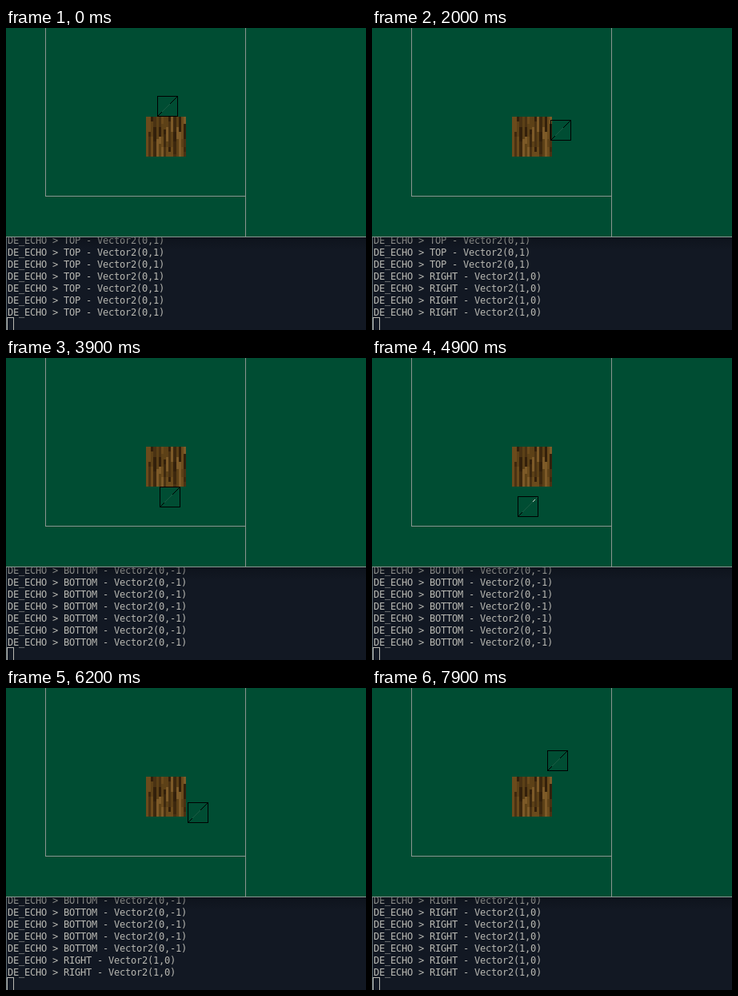
These frames come from a looping animation (450x378 px, 8000 ms). An HTML page with a canvas:

```html
<!DOCTYPE html>
<html lang="en">
<head>
<meta charset="utf-8">
<title>Collision sides</title>
<style>
  html, body { margin: 0; width: 100%; height: 100%; overflow: hidden; background: #004d33; }
  canvas { display: block; }
</style>
</head>
<body>
<canvas id="stage" width="450" height="378"></canvas>
<script>
const ctx = document.getElementById('stage').getContext('2d');
const LOOP = 8000, STEP = 100;
const BLOCK = { x: 175, y: 111, size: 50 };
const BOX = 26;
const CELL = { w: 7, h: 15 }, ROWS = 7, LINES_PER_STEP = 2;
const LINE = '#8a9690', TEXT = '#b8b8b2';

// Key points of the tour around the block: time, x, y
const path = [
  [0, 189, 85], [500, 199, 97], [900, 221, 67], [1200, 234, 71], [1700, 235, 108],
  [2000, 223, 115], [2800, 235, 133], [3100, 235, 157], [3900, 192, 161], [4900, 182, 173],
  [5800, 234, 162], [6200, 227, 143], [6700, 226, 141], [7400, 236, 92], [7900, 219, 78]
];

const messages = {
  top: 'TOP - Vector2(0,1)',
  right: 'RIGHT - Vector2(1,0)',
  bottom: 'BOTTOM - Vector2(0,-1)',
  left: 'LEFT - Vector2(-1,0)'
};

function rect(color, x, y, w, h) {
  ctx.fillStyle = color;
  ctx.fillRect(x, y, w, h);
}

function frame(color, x, y, w, h) {
  ctx.strokeStyle = color;
  ctx.lineWidth = 1;
  ctx.strokeRect(x + .5, y + .5, w - 1, h - 1);
}

function randomizer(seed) {
  return () => (seed = (seed * 16807) % 2147483647) / 2147483647;
}

// Vertical streaks on a 16 x 16 tile, dark grooves between lighter ridges
function makeBark() {
  const tile = document.createElement('canvas');
  tile.width = tile.height = 16;
  const pen = tile.getContext('2d');
  const random = randomizer(4217);
  const grooves = ['#33200b', '#3d280e', '#4a3213'];
  const ridges = ['#5d4117', '#6b4b1c', '#7d5a28'];
  for (let col = 0; col < 16; col++) {
    for (let row = 0; row < 16;) {
      const run = 2 + Math.floor(random() * 5);
      const groove = random() < (col % 2 ? .75 : .15);
      pen.fillStyle = (groove ? grooves : ridges)[Math.floor(random() * 3)];
      pen.fillRect(col, row, 1, run);
      row += run;
    }
  }
  return tile;
}
const bark = makeBark();

// Smooth curve through the key points
function positionAt(time) {
  const last = path.length - 1;
  let i = 0;
  while (i < last - 1 && path[i + 1][0] <= time) i++;
  const a = path[i], b = path[i + 1];
  const before = path[Math.max(i - 1, 0)], after = path[Math.min(i + 2, last)];
  const span = b[0] - a[0];
  const k = (time - a[0]) / span;
  return [1, 2].map(n => {
    const leave = (b[n] - before[n]) / (b[0] - before[0]) * span;
    const arrive = (after[n] - a[n]) / (after[0] - a[0]) * span;
    const ease = k * k * (3 - 2 * k);
    return Math.round(a[n] + (b[n] - a[n]) * ease
      + leave * k * (1 - k) ** 2 - arrive * k * k * (1 - k));
  });
}

// Nearest side of the block and the distance to it
function contact([x, y]) {
  const gaps = {
    top: BLOCK.y - y - BOX,
    right: x - BLOCK.x - BLOCK.size,
    bottom: y - BLOCK.y - BLOCK.size,
    left: BLOCK.x - x - BOX
  };
  const side = Object.keys(gaps).reduce((a, b) => gaps[b] > gaps[a] ? b : a);
  return { side, gap: gaps[side] };
}

function logAt(time) {
  const lines = Array(ROWS).fill(messages.top);
  for (let t = 0; t <= time; t += STEP) {
    const { side, gap } = contact(positionAt(t));
    if (gap <= 2) lines.push(...Array(LINES_PER_STEP).fill(messages[side]));
  }
  return lines.slice(-ROWS);
}

function drawWorld() {
  rect('#004d33', 0, 0, 450, 261);
  rect(LINE, 49, 0, 1, 211);
  rect(LINE, 299, 0, 1, 261);
  rect(LINE, 50, 210, 249, 1);
  ctx.imageSmoothingEnabled = false;
  ctx.drawImage(bark, BLOCK.x, BLOCK.y, BLOCK.size, BLOCK.size);
}

function drawBox([x, y]) {
  frame('#000', x, y, BOX, BOX);
  const apart = contact([x, y]).gap > 8;
  for (let i = 1; i < BOX - 1; i++) {
    let color = '#1a5b43';
    if (i < 6 || (!apart && i > 15)) color = '#000';
    else if (apart && i > 18 && i < 22) color = '#d5e2dc';
    rect(color, x + i, y + BOX - 1 - i, 1, 1);
  }
}

// Terminal text sits on a fixed grid of character cells
function drawLine(text, x, y) {
  [...text].forEach((char, i) => ctx.fillText(char, x + i * CELL.w, y));
}

function drawConsole(lines) {
  rect('#121823', 0, 261, 450, 117);
  ctx.save();
  ctx.beginPath();
  ctx.rect(0, 262, 450, 116);
  ctx.clip();
  ctx.font = '12px "DejaVu Sans Mono", monospace';
  ctx.fillStyle = TEXT;
  lines.forEach((line, i) => drawLine('DE_ECHO > ' + line, 2, 270 + i * CELL.h));
  frame(TEXT, 1, 362, CELL.w + 2, CELL.h + 2);
  ctx.restore();
  const shade = ctx.createLinearGradient(0, 262, 0, 277);
  shade.addColorStop(0, 'rgba(10,14,20,.45)');
  shade.addColorStop(1, 'rgba(10,14,20,0)');
  rect(shade, 0, 262, 450, 15);
  rect('#5f6d72', 0, 262, 1, 116);
  rect(LINE, 0, 261, 450, 1);
}

function draw(now) {
  const time = Math.floor((now % LOOP) / STEP) * STEP;
  drawWorld();
  drawBox(positionAt(time));
  drawConsole(logAt(time));
}

const start = performance.now();
function tick() {
  draw(performance.now() - start);
  requestAnimationFrame(tick);
}
tick();
</script>
</body>
</html>
```
